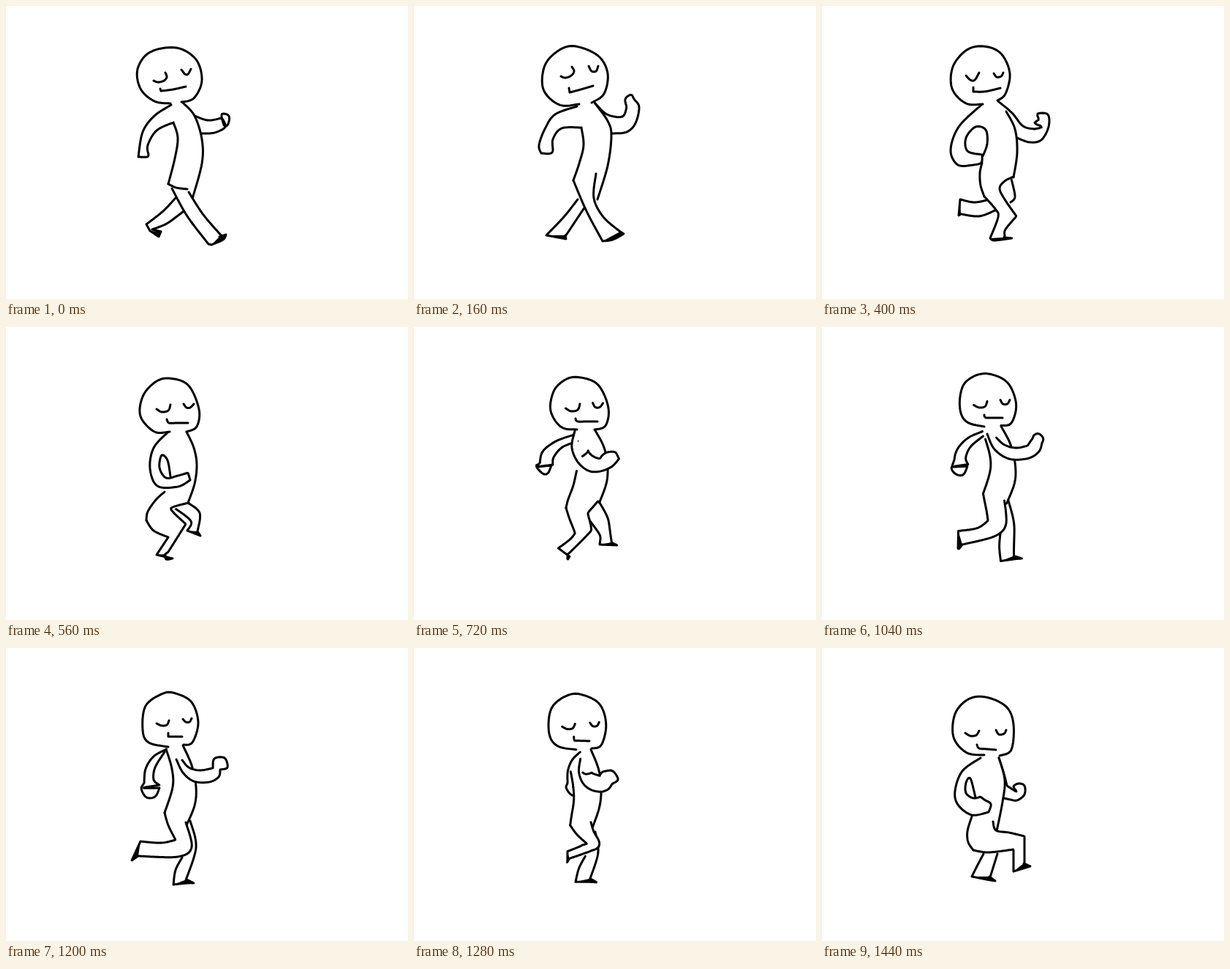
Write an HTML page with a canvas that moves like this. It is 550 px wide and 400 px high and loops after 1520 ms.

```html
<!DOCTYPE html>
<html lang="en">
<head>
<meta charset="utf-8">
<title>Walk cycle</title>
<style>
  html, body { margin: 0; width: 100%; height: 100%; overflow: hidden; background: #fff; }
  canvas { display: block; }
</style>
</head>
<body>
<canvas id="stage" width="550" height="400"></canvas>
<script>
const ctx = document.getElementById('stage').getContext('2d');
const STEP = 80, STEPS = 19, SAMPLES = 60;
const KEYS = [0, 2, 5, 7, 11, 15, 18]; // step on which each pose stands

const mix = (a, b, t) => a + (b - a) * t;
const mixPoint = (p, q, t) => [mix(p[0], q[0], t), mix(p[1], q[1], t)];

// Smooth curve through the points; "|" after a point makes it a corner.
function flatten(text) {
  const out = [];
  let last = null;
  for (const run of text.split('|')) {
    const pts = run.trim().split(/\s+/).map(p => p.split(',').map(Number));
    if (last) pts.unshift(last);
    last = pts[pts.length - 1];
    out.push(pts[0]);
    for (let i = 0; i < pts.length - 1; i++) {
      const b = pts[i], c = pts[i + 1], a = pts[i - 1] || b, d = pts[i + 2] || c;
      for (let s = 1; s <= 12; s++) {
        const t = s / 12;
        out.push([0, 1].map(k => b[k] + t / 2 * (c[k] - a[k]
          + t * (2 * a[k] - 5 * b[k] + 4 * c[k] - d[k] + t * (3 * (b[k] - c[k]) + d[k] - a[k])))));
      }
    }
  }
  return out;
}

// Evenly spaced points, so that any two poses of a line can be blended.
function resample(pts) {
  const dist = [0];
  for (let i = 1; i < pts.length; i++)
    dist.push(dist[i - 1] + Math.hypot(pts[i][0] - pts[i - 1][0], pts[i][1] - pts[i - 1][1]));
  const total = dist[dist.length - 1];
  let i = 1;
  return Array.from({ length: SAMPLES }, (_, n) => {
    const want = total * n / (SAMPLES - 1);
    while (i < pts.length - 1 && dist[i] < want) i++;
    return mixPoint(pts[i - 1], pts[i], (want - dist[i - 1]) / (dist[i] - dist[i - 1] || 1));
  });
}

// One line of the figure in all seven poses; an empty pose hides it.
const track = (...poses) => poses.map(p => p && resample(flatten(p)));

const head = track(
  '225,133 203,130 184,113 180,86 197,63 233,57 260,73 268,102 257,126 240,131',
  '226,134 199,135 177,114 179,81 199,60 221,55 252,68 265,92 260,120 243,132',
  '220,134 197,133 178,113 179,83 198,60 222,55 245,65 257,92 251,120 240,129',
  '224,143 203,143 184,122 187,95 203,76 222,70 249,79 264,112 261,136 247,143',
  '222,137 200,130 190,107 195,81 208,69 224,66 253,77 268,108 263,134 247,137',
  '222,135 195,129 187,112 191,79 215,62 232,62 254,74 263,102 255,129 243,132',
  '222,146 198,143 180,122 182,90 200,70 224,67 252,80 262,104 259,139 243,147');

const nearEye = track(
  '202,102 208,104 216,102 220,97 218,91', '201,96 207,98 215,95 219,89 216,83',
  '197,95 203,101 209,101 215,91', '206,112 213,116 222,114 225,106',
  '209,110 217,114 226,112 229,104', '206,103 213,106 220,105 223,99',
  '196,116 203,120 211,119 215,113');

const farEye = track(
  '240,87 245,93 249,93 253,86', '239,82 243,89 249,89 252,82',
  '235,92 239,97 245,96 248,91', '243,105 247,110 252,110 257,105',
  '246,102 249,109 256,109 260,103', '242,97 246,101 251,101 254,96',
  '238,112 242,118 249,117 252,112');

const mouth = track(
  '211,113 212,116|228,114 246,110', '212,112 213,118|228,114 245,109',
  '207,111 207,117|221,117 232,115 244,112', '220,126 223,131 234,131 249,131',
  '222,124 224,127 236,127 253,127', '222,116 222,121|232,121 241,121',
  '212,132 215,137 226,138 238,139');

const back = track(
  '229,159 235,180 231,208 222,243', '229,166 232,190 226,215 218,238',
  '219,214 216,228 217,245 222,260', '217,225 205,236 194,252 192,264',
  '228,168 233,190 231,208 224,230', '219,138 227,165 228,190 217,225',
  '205,230 199,250 200,265 207,276');

const front = track(
  '242,132 258,150 268,182 268,215 255,263', '247,132 265,157 270,177 265,218 251,264',
  '252,144 264,168 267,200 262,234', '247,143 257,165 261,188 258,214 249,240',
  '248,138 261,159 268,182 269,210 258,240', '242,133 254,160 260,190 258,215 247,242',
  '242,150 250,180 247,210 239,250');

const hem = track('222,243 233,248 248,250', '', '', '', '', '', '');
const farThigh = track('', '', '259,236 264,260 258,268', '', '', '', '');

const nearArmOuter = track(
  '226,135 203,150 187,172 181,206',
  '223,137 193,148 179,168 171,190 174,201',
  '218,135 187,165 176,197 186,217 207,217',
  '221,144 202,165 197,193 207,217 235,218 252,209',
  '219,140 230,164 255,178 285,176 302,165 309,151',
  '233,152 242,170 257,182 278,183 291,176 293,166',
  '217,150 192,168 182,195 186,214 205,228 228,224');

const nearArmInner = track(
  '181,206|193,206 195,203|194,190 206,170 229,159',
  '174,201|189,200 190,182 202,167 229,166',
  '207,217|218,214 219,203|199,198 197,180 210,165 224,169 226,188 220,205',
  '252,209 249,199|235,203 219,206 210,192 213,175 221,182 225,204',
  '309,151|300,140 291,140 287,147|290,155 268,163 250,159 236,149',
  '293,166|303,163 299,150 285,151 283,164|265,167 250,163 241,153',
  '228,224|231,213 222,207 217,203|207,205 197,198 197,184 203,178 210,204');

const farArm = track(
  '256,149 276,156 295,153|296,147 305,150 304,161 299,164 295,152|300,165 285,173 268,174',
  '248,133 264,148 285,151 291,138|289,127 297,121 301,127 308,138 303,160 291,172 271,174',
  '241,130 260,146 275,164 291,168|301,165 291,160 297,155|295,147 309,148 310,165 300,183 284,186 267,180',
  '',
  '219,147 194,156 176,170 172,187|167,190 176,200 183,200 188,189|167,191 190,188|191,178 203,164 224,156',
  '220,138 202,148 191,165 189,185|185,192 192,204 204,203 210,191|187,191 210,187|202,180 204,163 217,142',
  '242,150 249,172 253,188|266,196 262,189 269,185 277,188 277,200 267,208 258,207 249,205');

const nearLegBack = track(
  '227,249 248,287 277,325', '218,238 236,280 258,321',
  '222,260 237,277 241,288 230,317', '192,264 202,278 222,287|206,311',
  '224,230 225,254 215,281 189,293', '217,225 222,242 232,262|212,266 184,264',
  '207,276 228,279 262,275|262,305');

const nearFoot = track(
  '281,326 297,319 301,312|292,315', '258,321|272,319 287,311|282,308',
  '230,317 236,320 260,317|249,316', '206,311 228,316|219,317 218,310',
  '189,293|201,317|203,310', '184,264|172,290|181,284', '262,305|285,298|276,294');

const nearLegFront = track(
  '296,315 270,285 250,254', '282,308 259,288 246,262 249,229',
  '250,314 251,305 266,287|250,264 243,249 250,239 262,233',
  '222,307 246,269|228,252 228,246 250,240',
  '203,310 235,290 247,275 252,250 253,236',
  '181,284 235,285 254,272 246,238',
  '277,294 277,257|256,252 238,249 234,237');

const farLegBack = track(
  '232,262 215,280 192,298', '224,264 205,288 181,313', '226,265 208,268 189,264',
  '232,248 253,265 248,278', '247,278 253,296 260,316', '241,286 232,303 229,323',
  '221,281 212,298 205,312');

const farFoot = track(
  '197,307|209,315|212,308', '181,313|208,318|207,313', '189,264|187,286|190,284',
  '248,278|266,285|262,279', '260,316|290,311|278,309', '229,323|248,321 257,321|247,316',
  '205,312|225,316 237,318|229,312');

const farLegFront = track(
  '200,305 220,297 242,281', '208,313 222,292 234,274', '190,284 215,287 237,279',
  '262,279 265,254 249,240', '279,309 270,285 258,238', '246,317 260,272 252,236',
  '230,313 240,281');

function trace(pts) {
  ctx.beginPath();
  for (const p of pts) ctx.lineTo(...p);
}

function draw(step) {
  let i = KEYS.length - 1;
  while (KEYS[i] > step) i--;
  const j = Math.min(i + 1, KEYS.length - 1);
  const t = i === j ? 0 : (step - KEYS[i]) / (KEYS[j] - KEYS[i]);

  const pose = line => {
    const a = line[i], b = line[j];
    if (!a || !b) return (t < 0.5 ? a : b) || [];
    return a.map((p, n) => mixPoint(p, b[n], t));
  };
  const ink = (...lines) => {
    trace(lines.flatMap(pose));
    ctx.stroke();
  };
  const fill = (color, pts) => {
    trace(pts);
    ctx.fillStyle = color;
    ctx.fill();
  };
  const limb = (...lines) => {
    fill('#fff', lines.flatMap(pose));
    ink(...lines);
  };
  const leg = (rear, foot, fore) => {
    limb(rear, foot, fore);
    fill('#000', pose(foot));
  };

  ctx.fillStyle = '#fff';
  ctx.fillRect(0, 0, 550, 400);
  ctx.strokeStyle = '#000';
  ctx.lineWidth = 3;
  ctx.lineCap = ctx.lineJoin = 'round';

  ink(farThigh);
  leg(farLegBack, farFoot, farLegFront);
  limb(farArm);
  fill('#fff', [...pose(front), ...pose(back).reverse()]);
  ink(front);
  leg(nearLegBack, nearFoot, nearLegFront);
  ink(back);
  ink(hem);
  limb(nearArmOuter, nearArmInner);
  for (const line of [head, nearEye, farEye, mouth]) ink(line);
}

function tick() {
  draw(Math.floor(performance.now() / STEP) % STEPS);
  requestAnimationFrame(tick);
}
tick();
</script>
</body>
</html>
```
